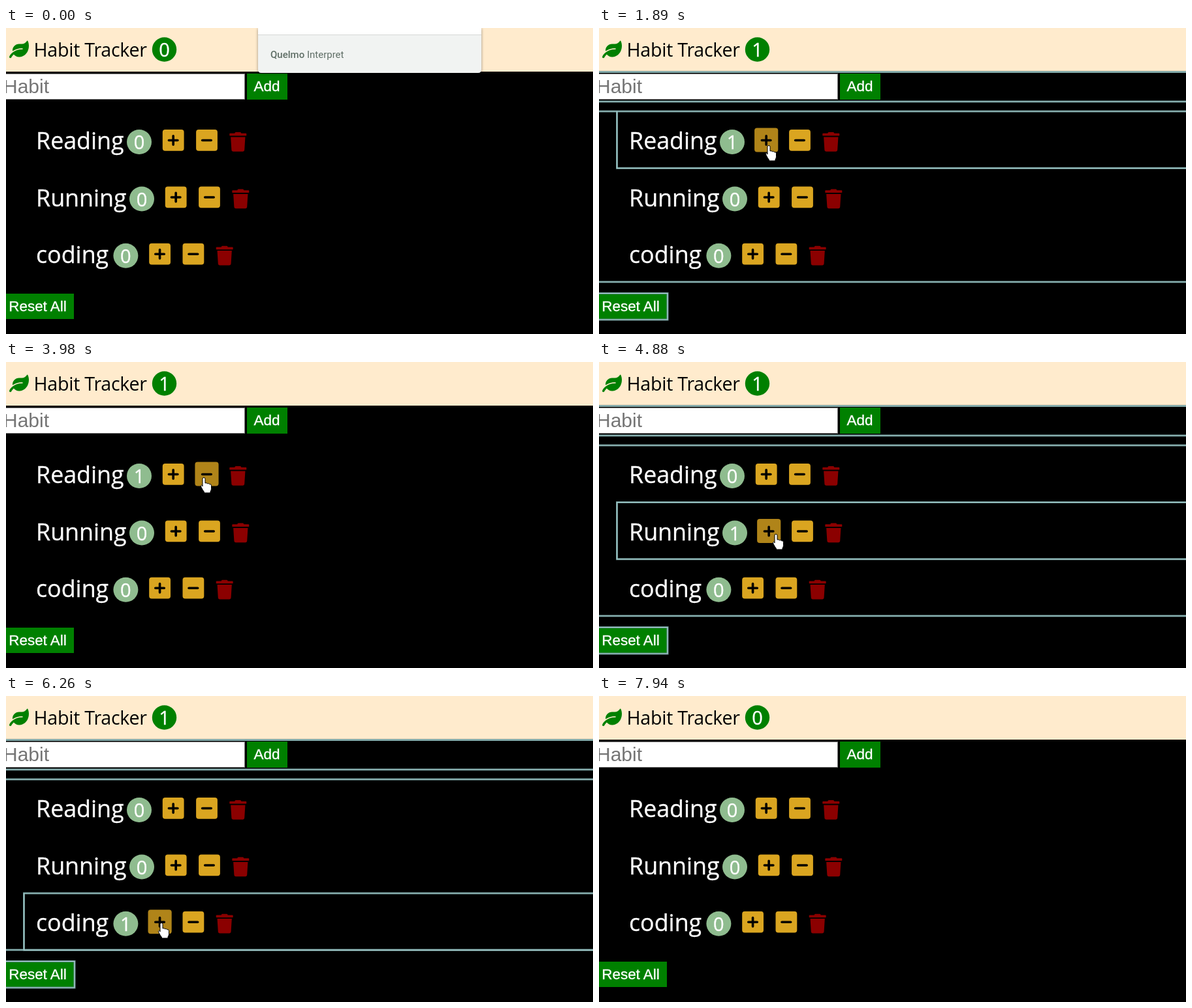
Recreate the animation shown at these times as an HTML page. Size 899 by 470 pixels, loop 8.86 s.

```html
<!DOCTYPE html>
<html lang="en">
<head>
<meta charset="utf-8">
<title>Habit Tracker</title>
<style>
  html, body { margin: 0; width: 100%; height: 100%; overflow: hidden; background: #000; }
  svg { display: block; width: 100%; height: 100%; }
  .ui { font-family: "Open Sans", "Noto Sans", sans-serif; }
  .form { font-family: "Liberation Sans", Arial, sans-serif; }
  .light { fill: #fff; stroke: #fff; stroke-width: .35; }
  .mid { text-anchor: middle; }
  #popup { filter: drop-shadow(0 1px 2px rgba(0, 0, 0, .4)); }
  #popup text { font: 15px Roboto, sans-serif; fill: #5f6e66; }
</style>
</head>
<body>
<svg id="stage" viewBox="0 0 899 470" preserveAspectRatio="none">
  <rect width="899" height="470"/>
  <rect width="899" height="67" fill="#ffebcd"/>
  <g fill="green">
    <path transform="translate(5 19.500) scale(.0521)" d="M546 10c-5-13-21-13-28-1C487 62 431 96 368 96h-80C182 96 96 182 96 288c0 7 1 14 1.500 20.500C161 263 253 224 384 224c9 0 16 7 16 16s-7 16-16 16C133 256 26 410 2.400 468c-6.600 16 1 35 17.500 41.600c16 7 35-1 42-17c1.500-4 21-48 72-91c32 44 94 86 175 77C465 467 576 327 576 154c0-50-11-102-30-144z"/>
    <circle cx="242.500" cy="33" r="18.700"/>
  </g>
  <text class="ui" x="42.500" y="44" font-size="28.600" letter-spacing="-.25">Habit Tracker</text>
  <text class="ui mid light" id="total" x="242.500" y="44" font-size="29">0</text>

  <rect x="-4" y="70.500" width="369.500" height="39" fill="#fff" stroke="#767676"/>
  <text class="form" x="-4" y="100" font-size="30" fill="#757575">Habit</text>
  <rect x="369" y="70" width="62" height="40" fill="green"/>
  <text class="form mid light" x="399.500" y="97" font-size="22.500">Add</text>
  <rect y="408" width="104" height="39" fill="green"/>
  <text class="form mid light" x="48.500" y="435" font-size="22.400">Reset All</text>

  <g id="rows"></g>
  <g id="marks" fill="none">
    <path id="glow" stroke="#658989" stroke-width="3"/>
    <path id="core" stroke="#a9d4d4" stroke-width="1.200"/>
  </g>

  <g id="popup">
    <path d="M386 0h342v64q0 5-5 5h-332q-5 0-5-5z" fill="#f1f3f2"/>
    <path d="M386 0h342v10h-342z" fill="#fff"/>
    <path d="M386 10.500h342" stroke="#d6d8d7"/>
    <text x="405" y="46"><tspan font-weight="500">Quelmo</tspan> Interpret</text>
  </g>

  <g id="cursor" fill="#fff" stroke="#000" stroke-linejoin="round">
    <path id="hand" transform="translate(1 1)" d="M-2 1.500q0-2 2-2t2 2v6.500q2.200-1 3.400.8q2-.9 3.200.9q2.800-.6 2.900 2v4.800q0 2.500-1.500 4.500v2h-9.500v-1.500q-2-2.200-4.500-7.200q-1.200-3 .6-3.200q1 0 1.400 1.800z"/>
    <path id="arrow" d="M0 0v18.500l4.300-4l2.800 6.600l3-1.300l-2.800-6.400h6z"/>
  </g>
</svg>
<script>
const LOOP = 8860, STEP = 70, START = 560, EXIT = 7940;
const $ = id => document.getElementById(id);

const habits = [
  { name: "Reading", dx: 0, dy: 0 },
  { name: "Running", dx: 4, dy: 87.5 },
  { name: "coding", dx: -20.6, dy: 174.7 }
];
const buttonX = [239.8, 291.1], SIZE = 32.8, TOP = 156;

// time, changed properties; focus is row * 2 + button
const events = [
  [0, { counts: [0, 0, 0], lit: -1, focus: -1 }],
  [1460, { focus: 0 }],
  [1660, { counts: [1, 0, 0], lit: 0 }],
  [2280, { lit: -1 }],
  [2890, { counts: [2, 0, 0], lit: 0 }],
  [3380, { focus: 1 }],
  [3520, { counts: [1, 0, 0] }],
  [3980, { lit: -1 }],
  [4120, { counts: [0, 0, 0], lit: 0 }],
  [4680, { lit: -1, focus: 2 }],
  [4880, { counts: [0, 1, 0], lit: 1 }],
  [5410, { focus: 3 }],
  [5550, { counts: [0, 0, 0] }],
  [6120, { lit: -1, focus: 4 }],
  [6260, { counts: [0, 0, 1], lit: 2 }],
  [6860, { lit: -1 }],
  [6930, { focus: 5 }],
  [7110, { counts: [0, 0, 0], lit: 2 }],
  [7730, { lit: -1 }],
  [EXIT, { focus: -1 }]
];

// time, x, y of the pointer tip
const path = [
  [START, 478, 436], [910, 341, 347], [1180, 272, 225], [1390, 259, 180],
  [2950, 259, 180], [3280, 298, 178], [3340, 298, 178], [3450, 302, 177],
  [4180, 302, 177], [4600, 270, 264], [4940, 270, 264], [5270, 305, 266],
  [5760, 305, 266], [6110, 237, 348], [6440, 237, 348], [6790, 287, 351],
  [7400, 287, 351], [7870, 330, 432]
];

function rowMarkup({ name, dx, dy }) {
  const button = (x, vertical) => `<rect class="btn" rx="4"/>
    <path d="M${x + 9.6} 172.500h13.500${vertical ? "m-6.750-6.750v13.500" : ""}" stroke="#000" stroke-width="3.600" stroke-linecap="round"/>`;
  return `<g transform="translate(0 ${dy})">
    <text class="ui light" x="46" y="186" font-size="35.800">${name}</text>
    <g transform="translate(${dx})">
      <circle cx="204" cy="175" r="19" fill="#8fbc8f"/>
      <text class="ui mid light count" x="204" y="186" font-size="29">0</text>
      ${button(buttonX[0], true)}${button(buttonX[1], false)}
      <path transform="translate(342.300 160) scale(.058)" fill="#8b0000" d="M432 32H312l-9-19q-7-13-22-13H167q-15 0-22 13L136 32H16Q0 32 0 48v32q0 16 16 16h416q16 0 16-16V48q0-16-16-16zM53 467q4 45 48 45h246q44 0 48-45L416 128H32z"/>
    </g></g>`;
}
$("rows").innerHTML = habits.map(rowMarkup).join("");
const counts = document.querySelectorAll(".count");
const buttons = [...document.querySelectorAll(".btn")];

function stateAt(t) {
  const state = {};
  for (const [at, change] of events) if (at <= t) Object.assign(state, change);
  return state;
}

function pointerAt(t) {
  if (t < START || t >= EXIT) return null;
  const q = START + Math.floor((t - START) / STEP) * STEP;
  const i = path.findIndex(p => p[0] > q);
  if (i < 0) return path[path.length - 1].slice(1);
  const [t0, x0, y0] = path[i - 1], [t1, x1, y1] = path[i];
  const k = (q - t0) / (t1 - t0);
  return [x0 + (x1 - x0) * k, y0 + (y1 - y0) * k];
}

function hoveredButton(point) {
  if (!point) return -1;
  return buttons.findIndex((_, i) => {
    const { dx, dy } = habits[i >> 1];
    const x = point[0] - dx - buttonX[i % 2], y = point[1] - dy - TOP;
    return x >= 0 && x <= SIZE && y >= 0 && y <= SIZE;
  });
}

function setAttrs(el, attrs) {
  for (const key in attrs) el.setAttribute(key, attrs[key]);
}

function show(el, on) {
  el.setAttribute("visibility", on ? "visible" : "hidden");
}

function outline(row) {
  const y = 128 + row * 87.5;
  return `M0 67.500H899M0 113H899M0 128H899M0 390H899M902 ${y}H27.500V${y + 87.3}H902M-3 407.500H105V448H-3`;
}

function draw(t) {
  const { counts: values, lit, focus } = stateAt(t);
  const point = pointerAt(t), hover = hoveredButton(point);

  $("total").textContent = values.filter(v => v > 0).length;
  counts.forEach((el, i) => { el.textContent = values[i]; });
  buttons.forEach((el, i) => {
    const grow = i === focus ? 1.7 : 0, size = SIZE + grow * 2;
    setAttrs(el, {
      x: buttonX[i % 2] - grow, y: TOP - grow * 1.4, width: size, height: size + grow * .4,
      fill: i === hover ? "#b08419" : "#daa520"
    });
  });

  show($("marks"), lit >= 0);
  if (lit >= 0) for (const id of ["glow", "core"]) $(id).setAttribute("d", outline(lit));
  show($("popup"), t < 1660);

  show($("hand"), point && hover >= 0);
  show($("arrow"), point && hover < 0);
  if (point) $("cursor").setAttribute("transform", `translate(${point})`);
}

const begin = performance.now();
function frame() {
  draw((performance.now() - begin) % LOOP);
  requestAnimationFrame(frame);
}
frame();
</script>
</body>
</html>
```
